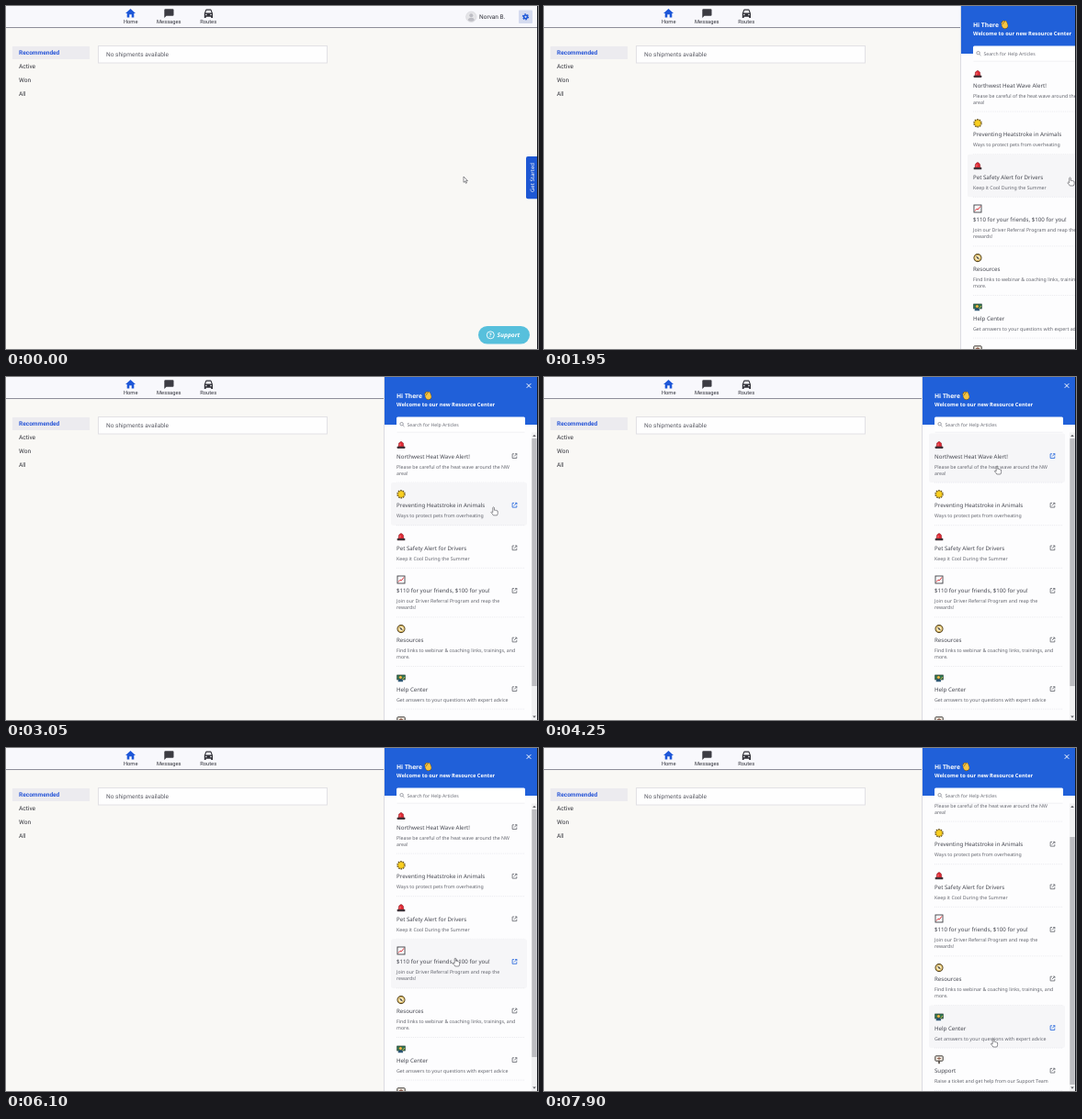
An HTML page that plays this animation: 579x374 px, repeating every 8000 ms.

```html
<!DOCTYPE html>
<html lang="en">
<head>
<meta charset="utf-8">
<style>
  html, body { margin: 0; width: 100%; height: 100%; overflow: hidden; background: #f9f8f5; }
  svg { display: block; width: 100vw; height: 100vh; text-rendering: geometricPrecision; }
  text { font-family: Roboto, sans-serif; font-size: 6.55px; fill: #33343c; }
  .nav { font-size: 5.75px; text-anchor: middle; }
  .ui text, text.ui { font-family: "Noto Sans", "Open Sans", sans-serif; }
  .title { font-size: 6.15px; fill: #44464f; }
  .desc { font-size: 5.25px; fill: #62646d; }
  .white { fill: #fff !important; font-weight: 700; }
  .link { fill: none; stroke: #63656d; stroke-width: .8; }
  .row .hover { fill: none; }
  .row.on .hover { fill: #f6f6f8; }
  .row.on.ready .link { stroke: #1f62dc; }
</style>
</head>
<body>
<svg viewBox="0 0 579 374" preserveAspectRatio="none">
  <defs>
    <clipPath id="listArea"><rect y="60" width="167" height="314"/></clipPath>
    <g id="siren">
      <path d="M-3 2L-2.4-2Q0-5.6 2.4-2L3 2Z" fill="#e02a35" stroke="#7b1c24" stroke-width=".5"/>
      <path d="M-1.2 1L-.8-1.6" stroke="#ff8f8f" stroke-width=".8"/>
      <rect x="-4.3" y="1.6" width="8.6" height="2.2" rx=".5" fill="#403238"/>
    </g>
    <g id="sun">
      <circle r="4" fill="none" stroke="#5d4a12" stroke-width="1.4" stroke-dasharray="1.6 .9"/>
      <circle r="3.5" fill="#f9cf20" stroke="#8a6a10" stroke-width=".5"/>
    </g>
    <g id="chart">
      <rect x="-4" y="-4" width="8" height="8" fill="#fff" stroke="#3c3c42" stroke-width=".9"/>
      <path d="M-4 0H4M0-4V4" stroke="#ccd2da" stroke-width=".4"/>
      <path d="M-3 2.5L-1 .2L.3 1L3-2.6" fill="none" stroke="#e33a40" stroke-width="1"/>
    </g>
    <g id="compass">
      <circle r="4" fill="#fbeec4" stroke="#54431f" stroke-width="1.1"/>
      <circle r="3.1" fill="none" stroke="#d7a52e" stroke-width=".6"/>
      <path d="M-2-2L.7-.6L2 2L-.7.6Z" fill="#54514b"/>
    </g>
    <g id="helper">
      <rect x="-4.3" y="-3.2" width="8.6" height="5" fill="#2f7d55" stroke="#263a32" stroke-width=".7"/>
      <path d="M-3.4 4Q-3 .8-.6 .8Q1.8.8 2.2 4Z" fill="#2b5674"/>
      <circle cx="-.6" cy="-.7" r="1.8" fill="#f2c04b" stroke="#3a3021" stroke-width=".4"/>
      <path d="M1.6 1.6L4-1.2" stroke="#f2c04b" stroke-width=".8"/>
    </g>
    <g id="sign">
      <path d="M0 0V4.4" stroke="#4a4038" stroke-width="1.6"/>
      <rect x="-4.2" y="-4" width="8.4" height="5.4" rx=".8" fill="#f5f1e8" stroke="#3d3936" stroke-width="1"/>
      <path d="M-2.2-1.3H2.2M0-3V.6" stroke="#8c5b4a" stroke-width=".9"/>
    </g>
    <g id="wave" transform="rotate(-25)">
      <path d="M-2.3-.4V2Q-1.5 4.2.8 3.8Q2.7 3.5 2.8.4V-2.5M-1.7.5V-2.8M-.2 0V-3.7M1.3 0V-3.4" fill="#f6c544" stroke="#6b4a12" stroke-width="1.8" stroke-linecap="round"/>
      <path d="M-2.3-.4V2Q-1.5 4.2.8 3.8Q2.7 3.5 2.8.4V-2.5M-1.7.5V-2.8M-.2 0V-3.7M1.3 0V-3.4" fill="#f6c544" stroke="#f6c544" stroke-width="1.1" stroke-linecap="round"/>
    </g>
    <path id="launch" d="M-.4-2.3H-2.4V2.4H2.3V.4M.6-2.4H2.4V-.6M2.4-2.4L-.6.6"/>
  </defs>

  <rect width="579" height="374" fill="#f9f8f5"/>
  <rect width="579" height="23.5" fill="#f8f8fc"/>
  <path d="M0 23.5H579" stroke="#8d8d99"/>

  <path d="M135.5 3L130 8H131.7V12.5H134.3V9.3H136.7V12.5H139.3V8H141Z" fill="#1d57d8"/>
  <path d="M173.5 3.2H181.5Q182.5 3.2 182.5 4.2V9.8Q182.5 10.8 181.5 10.8H174.5L172.3 13V4.2Q172.3 3.2 173.5 3.2Z" fill="#3b3b42"/>
  <path d="M215.8 8L217.2 4.2Q217.5 3.6 218.1 3.6H222.7Q223.3 3.6 223.6 4.2L225 8V13H223.2V11.8H217.6V13H215.8ZM217.2 7.4H223.6L222.6 4.8H218.2Z" fill="#33333a" fill-rule="evenodd"/>
  <g fill="#f8f8fc"><circle cx="217.8" cy="9.5" r=".8"/><circle cx="223" cy="9.5" r=".8"/></g>
  <text class="nav" x="135.7" y="19">Home</text>
  <text class="nav" x="177.3" y="19">Messages</text>
  <text class="nav" x="220.2" y="19">Routes</text>

  <circle cx="506.3" cy="11.8" r="5.7" fill="#e5e5e8" stroke="#cfcfd4" stroke-width=".5"/>
  <path d="M502.8 15.5Q503 12.8 506.3 12.8T509.8 15.5Q506.3 18 502.8 15.5Z" fill="#bdbdc4"/>
  <circle cx="506.3" cy="10.2" r="2" fill="#bdbdc4"/>
  <text x="515" y="14.1">Norvan B.</text>
  <rect x="558" y="4.5" width="15" height="14.5" rx="1" fill="#d5dbef"/>
  <circle cx="565.5" cy="11.8" r="2.9" fill="none" stroke="#1d57d8" stroke-width="1.5" stroke-dasharray="1.5 1.537"/>
  <circle cx="565.5" cy="11.8" r="1.9" fill="none" stroke="#1d57d8" stroke-width="1.5"/>

  <rect x="7" y="44" width="84" height="14" fill="#ecebef"/>
  <text x="14" y="53.3" style="fill:#2b58d8;font-weight:700">Recommended</text>
  <text x="14" y="68.3">Active</text>
  <text x="14" y="83.3">Won</text>
  <text x="14" y="98.3">All</text>
  <rect x="100.5" y="43.5" width="249" height="18.5" fill="#fefefe" stroke="#e2e1e5"/>
  <text x="109" y="55" style="fill:#5c5d66">No shipments available</text>

  <rect x="514" y="349" width="56" height="19.5" rx="9.75" fill="#57c0dc"/>
  <circle cx="527.3" cy="358.8" r="4" fill="none" stroke="#fff" stroke-width=".9"/>
  <text class="ui white" x="527.3" y="361" text-anchor="middle" style="font-size:6px">?</text>
  <text class="ui white" x="534.5" y="361.3" style="font-size:6.6px;font-style:italic">Support</text>

  <g id="starter">
    <path d="M579 164H568Q566 164 566 166V208.3Q566 210.3 568 210.3H579Z" fill="#1d57d3"/>
    <text class="ui" transform="translate(575.2 203) rotate(-90)" style="font-size:6px;fill:#fff">Get Started</text>
  </g>

  <g id="panel" class="ui">
    <rect x="-1" width="1" height="374" fill="#dcdce2"/>
    <rect width="167" height="374" fill="#fdfdfe"/>
    <rect width="167" height="52" fill="#2060d9"/>
    <path d="M154.7 7.2L159.3 11.8M159.3 7.2L154.7 11.8" stroke="#fff" stroke-width="1"/>
    <text class="white" x="13" y="22.9" style="font-size:6.7px">Hi There</text>
    <use href="#wave" x="47" y="20.3"/>
    <text class="white" x="13" y="32.3" style="font-size:5.75px">Welcome to our new Resource Center</text>
    <g clip-path="url(#listArea)"><g id="list"></g></g>
    <rect x="13" y="43.5" width="140" height="16.5" rx="1.5" fill="#fff"/>
    <path d="M13.5 60.2H152.5" stroke="#e7e7ec" stroke-width=".6"/>
    <g fill="none" stroke="#777a84" stroke-width=".7"><circle cx="18.6" cy="51.2" r="1.7"/><path d="M19.9 52.5L21.5 54.1"/></g>
    <text x="24.5" y="53.6" style="font-size:5.15px;fill:#6b6d76">Search for Help Articles</text>
    <rect x="160" y="60.5" width="6" height="314" fill="#f1f1f2"/>
    <path d="M161.2 65L163 62.8L164.8 65ZM161.2 369.5L163 371.7L164.8 369.5Z" fill="#5f5f64"/>
    <rect id="thumb" x="160.3" y="67" width="5.4" height="270" fill="#bcbcc0"/>
  </g>

  <path d="M578.5 0V374" stroke="#16181f"/>
  <g id="cursor" stroke="#44444a" stroke-width=".6" stroke-linejoin="round" fill="#fff">
    <path id="arrow" d="M0 0V6.3L1.5 5L2.5 7.3L3.5 6.9L2.5 4.6H4.5Z"/>
    <path id="hand" d="M-.8 .6Q0-.5.8.6V3.4Q1.6 2.7 2.1 3.6Q2.9 3 3.4 4Q4.6 3.6 4.6 5V6.6Q4.5 8.2 3.8 9H-.2Q-1.2 7.3-2.7 5.8Q-2.2 4.4-.8 5.7Z"/>
  </g>
</svg>
<script>
const byId = id => document.getElementById(id);
const clamp01 = v => Math.min(1, Math.max(0, v));
const smooth = p => p * p * (3 - 2 * p);
const easeOut = p => 1 - (1 - p) ** 3;

const LOOP = 8000, PANEL_X = 412, PANEL_W = 168;
const OPEN_AT = 1740, OPEN_FOR = 570, SCROLL_AT = 7180, SCROLL_FOR = 420;

const articles = [
  ["siren", "Northwest Heat Wave Alert!", "Please be careful of the heat wave around the NW", "area!"],
  ["sun", "Preventing Heatstroke in Animals", "Ways to protect pets from overheating"],
  ["siren", "Pet Safety Alert for Drivers", "Keep it Cool During the Summer"],
  ["chart", "$110 for your friends, $100 for you!", "Join our Driver Referral Program and reap the", "rewards!"],
  ["compass", "Resources", "Find links to webinar & coaching links, trainings, and", "more."],
  ["helper", "Help Center", "Get answers to your questions with expert advice"],
  ["sign", "Support", "Raise a ticket and get help from our Support Team"]
];

let nextTop = 61.5;
const rows = articles.map(([icon, title, ...lines]) => {
  const top = nextTop, height = 39.6 + 7 * lines.length;
  nextTop += height;
  byId("list").insertAdjacentHTML("beforeend", `
    <g class="row" transform="translate(0 ${top})">
      <rect class="hover" x="7" width="148" height="${height}" rx="2"/>
      <path d="M13 ${height}H153" stroke="#dedee4" stroke-width=".6" stroke-dasharray="1 1"/>
      <use href="#${icon}" x="18" y="12.7"/>
      <text class="title" x="13" y="27">${title}</text>
      <use class="link" href="#launch" x="141.5" y="24.6"/>
      ${lines.map((line, i) => `<text class="desc" x="13" y="${38.2 + 7 * i}">${line.replace("&", "&amp;")}</text>`).join("")}
    </g>`);
  return { top, bottom: nextTop, node: byId("list").lastElementChild };
});

// Pointer stops: time, x, y
const path = [
  [0, 498, 186], [700, 498, 186], [1500, 573, 188], [1750, 573, 188], [2150, 572, 186],
  [2650, 572, 186], [3400, 497, 106], [3600, 497, 104], [3950, 493, 97], [4250, 493, 97],
  [4750, 490, 141], [5150, 490, 145], [5600, 489, 184], [5800, 489, 188], [6100, 489, 229],
  [6550, 489, 234], [6900, 491, 284], [7600, 491, 288], [7900, 489, 317], [8000, 489, 317]
];

function pointerAt(t) {
  const i = path.findIndex(stop => stop[0] > t);
  const [t0, x0, y0] = path[i - 1], [t1, x1, y1] = path[i];
  const p = smooth((t - t0) / (t1 - t0));
  return [x0 + (x1 - x0) * p, y0 + (y1 - y0) * p];
}

const show = (id, on) => byId(id).setAttribute("visibility", on ? "visible" : "hidden");
const move = (id, x, y) => byId(id).setAttribute("transform", `translate(${x} ${y})`);

function draw(t) {
  const [x, y] = pointerAt(t);
  const open = easeOut(clamp01((t - OPEN_AT) / OPEN_FOR));
  const scroll = smooth(clamp01((t - SCROLL_AT) / SCROLL_FOR));
  const offset = 35 * scroll;
  const overButton = x > 565 && t < OPEN_AT + 200;

  move("panel", PANEL_X + PANEL_W * (1 - open), 0);
  show("panel", open > 0);
  move("list", 0, -offset);
  byId("thumb").setAttribute("y", 67 + 30 * scroll);
  move("starter", overButton ? -1 : 0, 0);

  for (const { top, bottom, node } of rows) {
    const over = open > .5 && y + offset >= top && y + offset < bottom;
    node.classList.toggle("on", over);
    node.classList.toggle("ready", open === 1);
  }

  const isLink = overButton || open > 0;
  move("cursor", x, y);
  show("hand", isLink);
  show("arrow", !isLink);
}

function tick() {
  draw(performance.now() % LOOP);
  requestAnimationFrame(tick);
}
tick();
</script>
</body>
</html>
```
